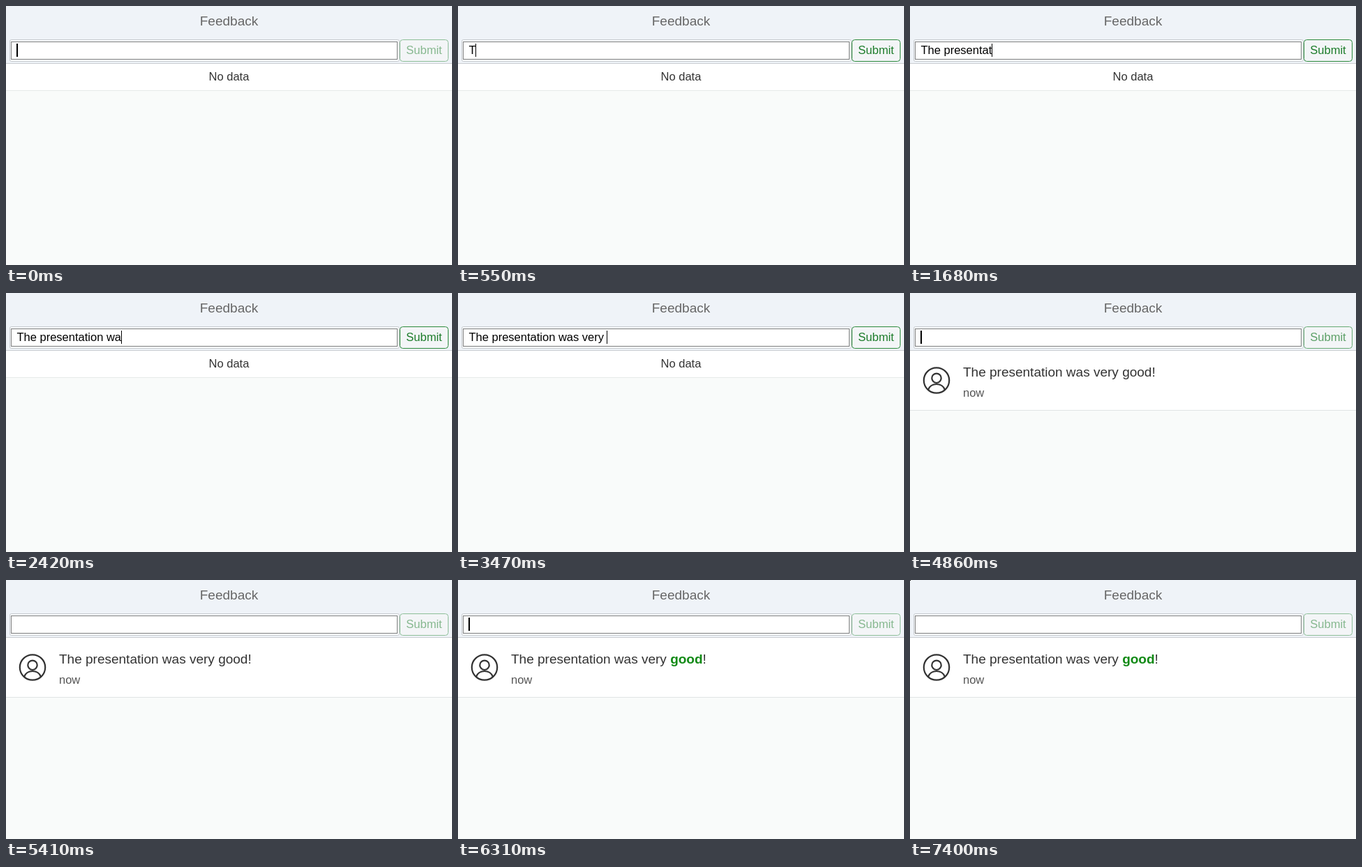
These frames come from a looping animation (639x372 px, 8 s). An HTML page:

```html
<!DOCTYPE html>
<html lang="en">
<head>
<meta charset="utf-8">
<title>Feedback</title>
<style>
  html, body { margin: 0; width: 100%; height: 100%; overflow: hidden; background: #f9fbfa; }
  svg { display: block; }
  text { font: 16.5px "Liberation Sans", Arial, sans-serif; fill: #333; white-space: pre; }
  .large { font-size: 19px; }
  .mid { text-anchor: middle; }
  #typed { fill: #000; }
  #good.on { font-weight: bold; fill: #128a16; }
  #button rect { fill: none; stroke: #2c8a3c; }
  #button text { fill: #1c7c2a; }
  #avatar { fill: none; stroke: #333; stroke-width: 2.2; }
</style>
</head>
<body>
<svg width="639" height="372" viewBox="0 0 639 372">
  <rect width="639" height="82" fill="#eff3f8"/>
  <rect y="82" width="639" height="1" fill="#c9cdd1"/>
  <text class="large mid" x="319.5" y="28" style="fill:#666">Feedback</text>

  <rect x="5.5" y="48.5" width="558" height="31" rx="2" fill="#f6f8fa" stroke="#c8ccd0"/>
  <rect x="7.5" y="51.5" width="553" height="25" fill="#fff" stroke="#000" stroke-dasharray="1 1"/>
  <text id="typed" x="15.5" y="69"></text>
  <rect id="caret" y="54" height="19"/>

  <rect x="564.5" y="48.5" width="69" height="31" rx="4" fill="#f3f5f7"/>
  <g id="button">
    <rect x="564.5" y="48.5" width="69" height="31" rx="4"/>
    <text class="mid" x="599" y="69">Submit</text>
  </g>

  <g id="empty">
    <rect y="83" width="639" height="38" fill="#fff"/>
    <rect y="121" width="639" height="1" fill="#e6e9e9"/>
    <text class="mid" x="319.5" y="107">No data</text>
  </g>

  <g id="item">
    <rect y="83" width="639" height="85" fill="#fff"/>
    <rect y="168" width="639" height="1" fill="#e1e4e4"/>
    <g id="avatar">
      <circle cx="38" cy="125.5" r="18.2"/>
      <circle cx="38" cy="122.3" r="6.7"/>
      <path d="M26 139Q29 131 38 131T50 139"/>
    </g>
    <text class="large" x="76" y="119.5">The presentation was very <tspan id="good" class="large">good</tspan>!</text>
    <text x="76" y="149" style="fill:#555">now</text>
  </g>
  <rect id="corner" width="1" height="1"/>
</svg>
<script>
const LOOP = 8000, MESSAGE = "The presentation was very good!";
const SENT = 4860, CLEARED = 5410, MARKED = 5950, END = 7400;
const $ = id => document.getElementById(id);
const show = (id, on) => $(id).setAttribute("visibility", on ? "visible" : "hidden");

// [time, value] steps; each value holds until the next time
const letters = [[0, 0], [340, 1], [960, 4], [1320, 8], [1500, 10], [1680, 13], [1860, 15],
  [2080, 16], [2290, 18], [2420, 19], [2570, 20], [2720, 21], [2900, 23], [3110, 24],
  [3320, 25], [3470, 26], [3770, 27], [4150, 30], [4360, 31], [SENT, 0]];
const caretOn = [[0, 1], [130, 0], [340, 1], [CLEARED, 0], [6310, 1], [6460, 0]];
const buttonAlpha = [[0, .5], [340, .75], [550, 1], [SENT, .7], [CLEARED, .5]];
const valueAt = (steps, t) => steps.findLast(([start]) => t >= start)[1];

function draw(t) {
  const count = valueAt(letters, t);
  $("typed").textContent = MESSAGE.slice(0, count);
  const width = count ? $("typed").getComputedTextLength() : 0;
  $("caret").setAttribute("x", Math.round(15 + width));
  $("caret").setAttribute("width", count ? 1 : 2);
  show("caret", valueAt(caretOn, t));
  $("button").setAttribute("opacity", valueAt(buttonAlpha, t));
  show("empty", t < SENT);
  show("item", t >= SENT);
  $("good").classList.toggle("on", t >= MARKED);
  show("corner", t >= END);
}

function tick() {
  draw(performance.now() % LOOP);
  requestAnimationFrame(tick);
}
tick();
</script>
</body>
</html>
```
